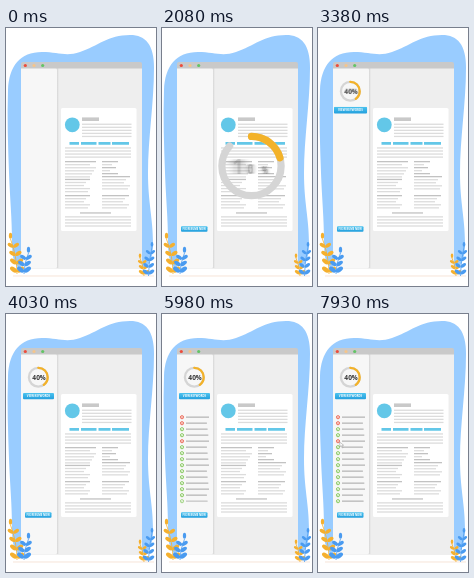
Write an HTML page that moves like this. It is 150 px wide and 258 px high and loops after 8000 ms.

```html
<!DOCTYPE html>
<html lang="en">
<head>
<meta charset="utf-8">
<title>Resume check</title>
<style>
  html, body { margin: 0; width: 100%; height: 100%; overflow: hidden; background: #fff; }
  svg { display: block; width: 100%; height: 100%; }
  text { font-family: "Open Sans", Arial, sans-serif; font-weight: 700; text-anchor: middle; }
  .anim {
    animation: var(--name) var(--dur) var(--ease, linear) both paused;
    animation-delay: calc(var(--at) - var(--t, 0ms));
    transform-box: fill-box;
    transform-origin: center;
  }
  .fix { --name: grow; --at: 420ms; --dur: 1600ms; }
  .view { --name: pop; --at: 2860ms; --dur: 900ms; }
  .row { --name: appear; --dur: 90ms; }
  .cursor { --name: point; --at: 6500ms; --dur: 1300ms; --ease: ease-in-out; transform-origin: 0 0; }
  .ring { --name: fly; --at: 2790ms; --dur: 580ms; transform-box: view-box; transform-origin: 0 0; }
  @keyframes grow { from { transform: scale(0); } to { transform: scale(1); } }
  @keyframes pop {
    0% { transform: scale(0); }
    14% { transform: scale(.16); }
    57% { transform: scale(1.07); }
    100% { transform: scale(1); }
  }
  @keyframes appear { from { opacity: 0; } to { opacity: 1; } }
  @keyframes point {
    from { transform: translate(44px, 134px); opacity: 0; }
    15% { opacity: 1; }
    to { transform: translate(21.5px, 128px); }
  }
  @keyframes fly {
    0% { transform: translate(89.5px, 138px) scale(3.15); }
    34.5% { transform: translate(86px, 133px) scale(2.85); }
    57% { transform: translate(66px, 107px) scale(2.3); }
    79.5% { transform: translate(39px, 72px) scale(1.3); }
    100% { transform: translate(32.3px, 63.2px) scale(1); }
  }
</style>
</head>
<body>
<svg viewBox="0 0 150 258" preserveAspectRatio="none">
  <defs>
    <linearGradient id="blue" x2="0" y2="1">
      <stop stop-color="#4cc3ef"/><stop offset="1" stop-color="#239fdd"/>
    </linearGradient>
    <linearGradient id="shade">
      <stop stop-color="#000" stop-opacity=".13"/><stop offset="1" stop-color="#000" stop-opacity="0"/>
    </linearGradient>
    <filter id="blur" x="-50%" y="-50%" width="200%" height="200%"><feGaussianBlur id="blurAmount" stdDeviation="0"/></filter>
  </defs>

  <path fill="#99ccff" d="M2 62C3 38 14 24 36 24C52 24 60 29 74 24C92 18 102 7 124 7C140 7 148 17 148 40C148 75 142 110 142 145C142 175 147 190 147 215Q147 240 136 240H14Q6 238 6 214C6 190 4 172 3 145C2 118 1 90 2 62z"/>
  <path d="M7 248H148" stroke="#f3d9c8" stroke-width=".7"/>

  <path fill="#eeeeee" d="M15 36H136V241H15z"/>
  <path fill="url(#shade)" d="M50.500 40h2.500v200h-2.500z"/>
  <path fill="#f7f7f7" d="M15 40H49q2 0 2 2V238.500q0 2-2 2H15z"/>
  <path fill="#c9c9c9" d="M15 36q0-2 2-2H134q2 0 2 2v4.500H15z"/>
  <circle cx="19.300" cy="37.500" r="1.600" fill="#ed4c3c"/>
  <circle cx="28" cy="37.500" r="1.600" fill="#f5c58b"/>
  <circle cx="36.700" cy="37.500" r="1.600" fill="#63c466"/>

  <rect x="55" y="80" width="75.500" height="123" rx="1.500" fill="#fff"/>
  <circle cx="66.300" cy="96.800" r="7.400" fill="#63c7e8"/>
  <path fill="#c9c9c9" d="M76 89.400h17v3.600H76z"/>
  <path fill="#63c7e8" d="M63.500 113.900h9.500v2.900h-9.500zM75 113.900h15.500v2.900H75zM92.500 113.900h12v2.900h-12zM106 113.900h17v2.900h-17z"/>
  <g id="page"></g>

  <g id="plants"></g>

  <g class="anim fix">
    <rect x="19" y="198.200" width="26.500" height="5.500" rx="1" fill="url(#blue)"/>
    <text x="32.200" y="201.900" font-size="2.700" fill="#fff">FIX RESUME NOW</text>
  </g>
  <g class="anim view">
    <rect x="17" y="79" width="31" height="6.300" rx="1" fill="url(#blue)"/>
    <text x="32.500" y="83.200" font-size="2.800" fill="#fff">VIEW KEYWORDS</text>
  </g>
  <g id="rows"></g>

  <g class="anim ring" fill="none" stroke-width="2.300" stroke-linecap="round">
    <circle id="track" r="9.400" stroke="#d5d5d5" pathLength="100" transform="rotate(-90)"/>
    <circle id="progress" r="9.400" stroke="#f3b229" pathLength="100" transform="rotate(-90)"/>
    <g id="digits"></g>
  </g>

  <path class="anim cursor" d="M0 0l.5 4.600 1.200-.9.900 2.200.9-.4-.9-2.100 1.500-.2z" fill="#fff" stroke="#777" stroke-width=".4"/>
</svg>

<script>
const LOOP = 8000, TICK = 130;
const $ = id => document.getElementById(id);
const clamp = v => Math.max(0, Math.min(1, v));
const span = (t, from, to) => clamp((t - from) / (to - from));

function add(parent, tag, attrs) {
  const el = document.createElementNS("http://www.w3.org/2000/svg", tag);
  for (const key in attrs) el.setAttribute(key, attrs[key]);
  return parent.appendChild(el);
}

// Text lines of the résumé, optionally with a darker heading and ragged edge
function paragraph(x, y, width, count, ragged) {
  for (let i = 0; i < count; i++) {
    const heading = ragged && i === 0;
    const short = ragged && !heading ? (i * 5 + count) % 4 * 2 : 0;
    add($("page"), "rect", {
      x, y: y + i * 3.05, height: 1.3, width: width - short,
      fill: heading ? "#c2c2c2" : "#dcdcdc"
    });
  }
}
paragraph(76, 95.6, 49.5, 5);
paragraph(59, 119.3, 66, 4);
paragraph(59, 133, 31, 6, true);
paragraph(59, 150.8, 25, 5, true);
paragraph(59, 167, 25, 5, true);
paragraph(96, 133, 16, 2, true);
paragraph(96, 139, 14, 2, true);
paragraph(96, 145, 16, 1, true);
paragraph(96, 148, 28, 5, true);
paragraph(96, 167, 27, 5, true);
paragraph(74, 184.3, 31, 1, true);
paragraph(59, 188.2, 66, 4);

// A bent stem with pairs of leaves and one leaf at the tip
function plant(x, base, tipX, tip, pairs, size, color) {
  const g = add($("plants"), "g", { fill: color });
  add(g, "path", { d: `M${x} ${base}Q${x} ${(base + tip) / 2} ${tipX} ${tip}`, fill: "none", stroke: color, "stroke-width": .8 });
  for (let i = 0; i <= pairs; i++) {
    const k = i / pairs, s = size * (1 - k * .25);
    const px = x + (tipX - x) * k * k, py = base - 2 - (base - tip - 2) * k;
    const sides = i === pairs ? [0] : [-55, 55];
    for (const turn of sides)
      add(g, "ellipse", { cy: -s * 1.05, rx: s * .55, ry: s, transform: `translate(${px} ${py}) rotate(${turn})` });
  }
}
plant(11, 246, 4.5, 211, 4, 4, "#f5b02e");
plant(18, 246, 22.5, 225, 3, 4, "#4a9bf0");
plant(138, 248, 134, 230, 3, 3, "#f5b02e");
plant(142.5, 248, 146, 219, 4, 3.3, "#4a9bf0");

// Keyword checklist
const missing = [0, 1, 4];
for (let i = 0; i < 15; i++) {
  const y = 103.2 + i * 6, bad = missing.includes(i);
  const color = bad ? "#e8523f" : "#72bf44";
  const row = add($("rows"), "g", { class: "anim row", style: `--at:${4580 + i * 95}ms` });
  add(row, "circle", { cx: 20, cy: y, r: 1.6, fill: "#fff", stroke: color, "stroke-width": .8 });
  add(row, "path", {
    d: bad ? `M19.3 ${y - .7}l1.4 1.4m0-1.4l-1.4 1.4` : `M19.2 ${y}l.6.6 1.1-1.2`,
    fill: "none", stroke: color, "stroke-width": .5
  });
  add(row, "rect", { x: 24, y: y - .8, width: 23 - i * 3 % 4 * .7, height: 1.6, fill: "#c4c4c4" });
}

const digits = [-4.3, -.3, 4.3].map(x => {
  const g = add($("digits"), "g", {});
  const ghosts = [-1, 1].map(side => ({
    side, el: add(g, "text", { "font-size": 6.6, fill: "#555", filter: "url(#blur)" })
  }));
  const glyph = add(g, "text", { "font-size": 6.6, fill: "#333" });
  return { x, g, ghosts, glyph };
});

function drawArc(id, amount) {
  $(id).setAttribute("stroke-dasharray", `${amount * 100} 200`);
  $(id).style.opacity = amount > 0 ? 1 : 0;
}

// Digits spin and smear while counting, then come to rest
function drawCounter(t) {
  const p = span(t, 1400, 2720);
  drawArc("track", span(t, 1400, 2180));
  drawArc("progress", p * .4);
  const label = String(Math.floor(p * 4 - .3 * (p < 1)) * 10).replace("-", "").padStart(2, "0").slice(-2) + "%";
  const spin = 1 - span(t, 2080, 2900), settle = span(t, 2800, 3800);
  $("blurAmount").setAttribute("stdDeviation", `${1.1 * (1 - settle)} .25`);
  digits.forEach(({ x, g, ghosts, glyph }, i) => {
    const shown = span(t, 1600, 2600);
    const width = 1 - .7 * spin * Math.abs(Math.sin((t - 2080) / 300 + i * .8));
    const slant = -22 * (1 - span(t, 2900, 3400)) * span(t, 2080, 2900);
    g.setAttribute("transform", `translate(${x} 2.4) skewX(${slant}) scale(${width} ${Math.sqrt(width)})`);
    for (const { side, el } of ghosts) {
      el.textContent = label[i];
      el.setAttribute("x", side * (1 - settle));
      el.style.opacity = .7 * shown * (1 - settle);
    }
    glyph.textContent = label[i];
    glyph.style.opacity = shown * (.3 + .7 * settle);
  });
}

function frame(now) {
  const t = Math.floor(now % LOOP / TICK) * TICK;
  document.documentElement.style.setProperty("--t", t + "ms");
  drawCounter(t);
  requestAnimationFrame(frame);
}
frame(0);
</script>
</body>
</html>
```
